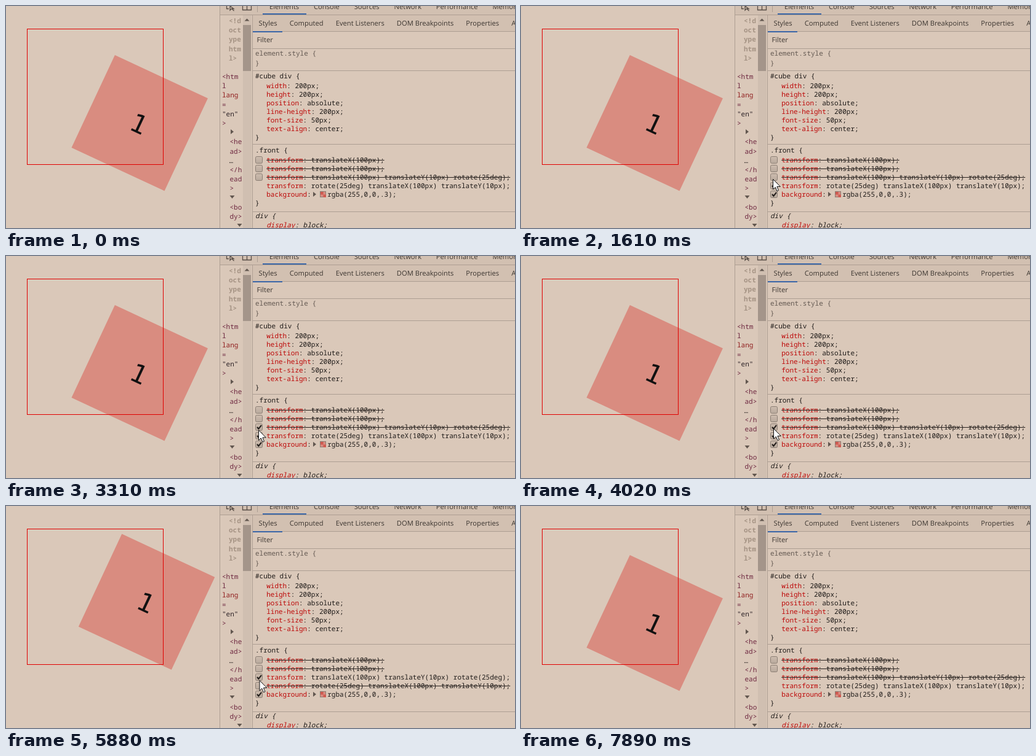
Write an HTML page that moves like this. It is 827 px wide and 362 px high and loops after 9.38 s.

```html
<!DOCTYPE html>
<html lang="en">
<head>
<meta charset="utf-8">
<title>Transform order in the styles panel</title>
<style>
  html, body { margin: 0; width: 100%; height: 100%; overflow: hidden; background: #dac8b9; }
  svg { display: block; width: 827px; height: 362px; }
  text { white-space: pre; text-rendering: geometricPrecision; fill: #1f1b19; }
  .mono { font: 11px "Noto Sans Mono", "Liberation Mono", monospace; }
  .ui { font: 11.2px "Open Sans", "Noto Sans", sans-serif; fill: #3d3631; }
  .digit { font: 41.67px "DejaVu Sans", sans-serif; fill: #111; text-anchor: middle; }
  .prop { fill: #bd0808; }
  .tag { fill: #6e2840; }
  .attr { fill: #912020; }
  .val { fill: #2e2428; }
  .dim { fill: #655a53; }
  .doctype { fill: #a59384; font-weight: bold; }
  .italic { font-style: italic; }
  .bar { fill: #d2c0b1; }
  .line { fill: none; stroke: #ad9e92; }
  .blue { fill: #3a66a8; }
  .arrow { fill: #62574f; }
  .icon { fill: none; stroke: #584e47; stroke-width: 1.3; }
  .box { fill: url(#face); stroke: #8b7e74; }
  .tick { fill: none; stroke: #241f1c; stroke-width: 2.1; }
</style>
</head>
<body>
<svg viewBox="0 0 827 362">
  <defs>
    <linearGradient id="face" x2="0" y2="1">
      <stop stop-color="#cdbcae"/><stop offset="1" stop-color="#b9aa9d"/>
    </linearGradient>
    <path id="open" class="arrow" d="M-4-2.500h8l-4 5z"/>
    <path id="shut" class="arrow" d="M-2.500-4v8l5-4z"/>
  </defs>

  <g id="cube">
    <rect x="-83.33" y="-83.33" width="166.67" height="166.67" fill="#d98c80"/>
    <text class="digit" y="16.6">1</text>
  </g>
  <rect x="34.5" y="37.5" width="221" height="221" fill="none" stroke="#e00000"/>

  <g id="panel">
    <path d="M348 0H827V41H401V14H348z" class="bar"/>
    <rect x="385" y="15" width="14" height="347" fill="#d0bfb1"/>
    <rect x="385" y="31" width="13" height="75" fill="#a4958a"/>
    <path d="M347.500 0V362M400.500 14V362M408.500 0V10M348 14.500H827" class="line"/>
    <path d="M401 41.500H827M401 69.500H827M401 105.500H827M401 225.500H827M401 335.500H827" class="line"/>
    <rect x="417" y="12" width="71" height="2" class="blue"/>
    <rect x="401" y="41" width="48" height="2" class="blue"/>
    <path d="M358.500 0V4.500H362M364 0v7l2.500-2.500H370zM366.500 4l4 4" class="icon"/>
    <path d="M384.500 0V6.500H398.500V0M391.500 0V6" class="icon"/>
    <path d="M387.500 24.500h8l-4-4z" class="arrow"/>
    <use href="#shut" x="367.5" y="205"/>
    <use href="#open" x="367.5" y="311.5"/>
    <use href="#open" x="379.5" y="357.5"/>
    <use href="#shut" x="501.5" y="307"/>
    <rect x="510.500" y="302.500" width="9" height="9" fill="#d98c80" stroke="#8b7e74"/>
    <path d="M511 303h4.500v9h4.500v-4.500h-9z" fill="#cf5a50"/>
  </g>

  <path id="cursor" d="M0 0V16.500L3.800 13 6.500 19.300 9 18.200 6.400 12H11.800Z"
        fill="#fff" stroke="#111" stroke-linejoin="round"/>
</svg>

<script>
const LOOP = 9380, STEP = 77, LINE = 14, CHAR = 6.6, INDENT = 423.2;
const panel = document.getElementById("panel");
const cube = document.getElementById("cube");
const cursor = document.getElementById("cursor");

function add(parent, tag, attrs, text = "") {
  const el = document.createElementNS("http://www.w3.org/2000/svg", tag);
  for (const key in attrs) el.setAttribute(key, attrs[key]);
  el.textContent = text;
  parent.append(el);
  return el;
}
const write = (cls, x, y, text) => add(panel, "text", { class: cls, x, y }, text);
const show = (el, on) => el.setAttribute("visibility", on ? "visible" : "hidden");

// One row of labels with an even gap
function tabs(x, y, gap, names) {
  const row = write("ui", x, y);
  names.split(",").forEach((name, i) => add(row, "tspan", { dx: i ? gap : 0 }, name));
}

function declare(y, text, style = "") {
  const [name, value] = text.split(": ");
  const line = write("mono " + style, INDENT, y);
  add(line, "tspan", { class: "prop" }, name);
  add(line, "tspan", {}, ": " + value);
}

tabs(428, 4.6, 23.8, "Elements,Console,Sources,Network,Performance,Memory");
tabs(410.5, 32, 20, "Styles,Computed,Event Listeners,DOM Breakpoints,Properties,Accessibility");
write("ui", 407.5, 59, "Filter");

// DOM tree, wrapped in its narrow column; "-" leaves a row free
function tree(cls, x, row, text) {
  text.split(" ").forEach((s, i) => {
    if (s !== "-") write("mono " + cls, x, 28 + (row + i) * 15.18, s);
  });
}
tree("doctype", 362, 0, "<!d oct ype htm l>");
tree("tag", 351, 6, "<htm l - = - >");
tree("attr", 351, 8, "lang");
tree("val", 351, 10, '"en"');
tree("tag", 363.5, 13, "<he ad> - </h ead > - <bo dy>");
tree("", 362.5, 15, "…");

// Style rules
write("mono dim", 405, 81, "element.style {");
write("mono dim", 405, 97, "}");
write("mono", 405, 118, "#cube div {");
["width: 200px;", "height: 200px;", "position: absolute;", "line-height: 200px;",
 "font-size: 50px;", "text-align: center;"].forEach((s, i) => declare(134 + i * LINE, s));
write("mono", 405, 218, "}");
write("mono", 405, 239, ".front {");
write("mono", 405, 325, "}");
write("mono italic", 405, 346, "div {");
declare(361, "display: block;", "italic");

const rows = [
  "transform: translateX(100px);",
  "transform: translateX(100px);",
  "transform: translateX(100px) translateY(10px) rotate(25deg);",
  "transform: rotate(25deg) translateX(100px) translateY(10px);",
  "background:    rgba(255,0,0,.3);"
].map((text, i) => {
  const y = 255 + i * LINE;
  declare(y, text);
  return {
    strike: add(panel, "rect", { x: INDENT, y: y - 4, width: text.length * CHAR, height: 1, fill: "#2a2320" }),
    box: add(panel, "rect", { class: "box", x: 405.5, y: y - 9.5, width: 11, height: 11, rx: 2 }),
    tick: add(panel, "path", { class: "tick", d: `M408 ${y - 4}l2.400 2.800 4.600-6` })
  };
});

// Pointer trips: start, end, resting place
const trips = [
  [200, 1130, 407, 288], [1220, 1450, 407, 284], [1610, 1610, 409, 282],
  [2220, 2220, 421, 286], [2300, 2370, 410, 286], [2600, 2600, 409, 282],
  [2690, 2690, 410, 281], [3240, 3490, 410, 291], [3860, 4020, 410, 281],
  [4320, 4400, 410, 291], [5170, 5400, 411, 298], [5640, 5880, 411.5, 284],
  [6100, 6190, 413, 287], [6330, 6330, 410, 293], [7110, 7340, 403, 294],
  [7500, 7890, 606, 364]
];

// Each trip runs straight, in even steps
function pointer(t) {
  let x = 557, y = 328;
  for (const [start, end, toX, toY] of trips) {
    if (t < start) break;
    const count = Math.round((end - start) / STEP) + 1;
    const pace = (end - start) / (count - 1) || 1;
    const done = Math.min(count, Math.floor((t - start) / pace + 1e-6) + 1) / count;
    x += (toX - x) * done;
    y += (toY - y) * done;
  }
  return { x, y, on: t >= 200 && t < 7890 };
}

function draw(t) {
  const { x, y, on } = pointer(t);
  show(cursor, on);
  cursor.setAttribute("transform", `translate(${x + 0.5} ${y + 0.5})`);

  const hover = on && y < 335;
  const off = t >= 4780 && t < 6640;
  const swapped = t >= 4860 && t < 6710;
  const checked = [false, false, t >= 2870, !off, true];
  const struck = [true, true, !swapped, swapped, false];
  rows.forEach((row, i) => {
    show(row.box, hover || !checked[i]);
    show(row.tick, hover && checked[i]);
    show(row.strike, struck[i]);
  });

  const shift = "translate(83.33 8.33)", turn = "rotate(25)";
  cube.setAttribute("transform",
    "translate(145.2 148)" + (off ? shift + turn : turn + shift));
}

function frame() {
  draw(performance.now() % LOOP);
  requestAnimationFrame(frame);
}
frame();
</script>
</body>
</html>
```
